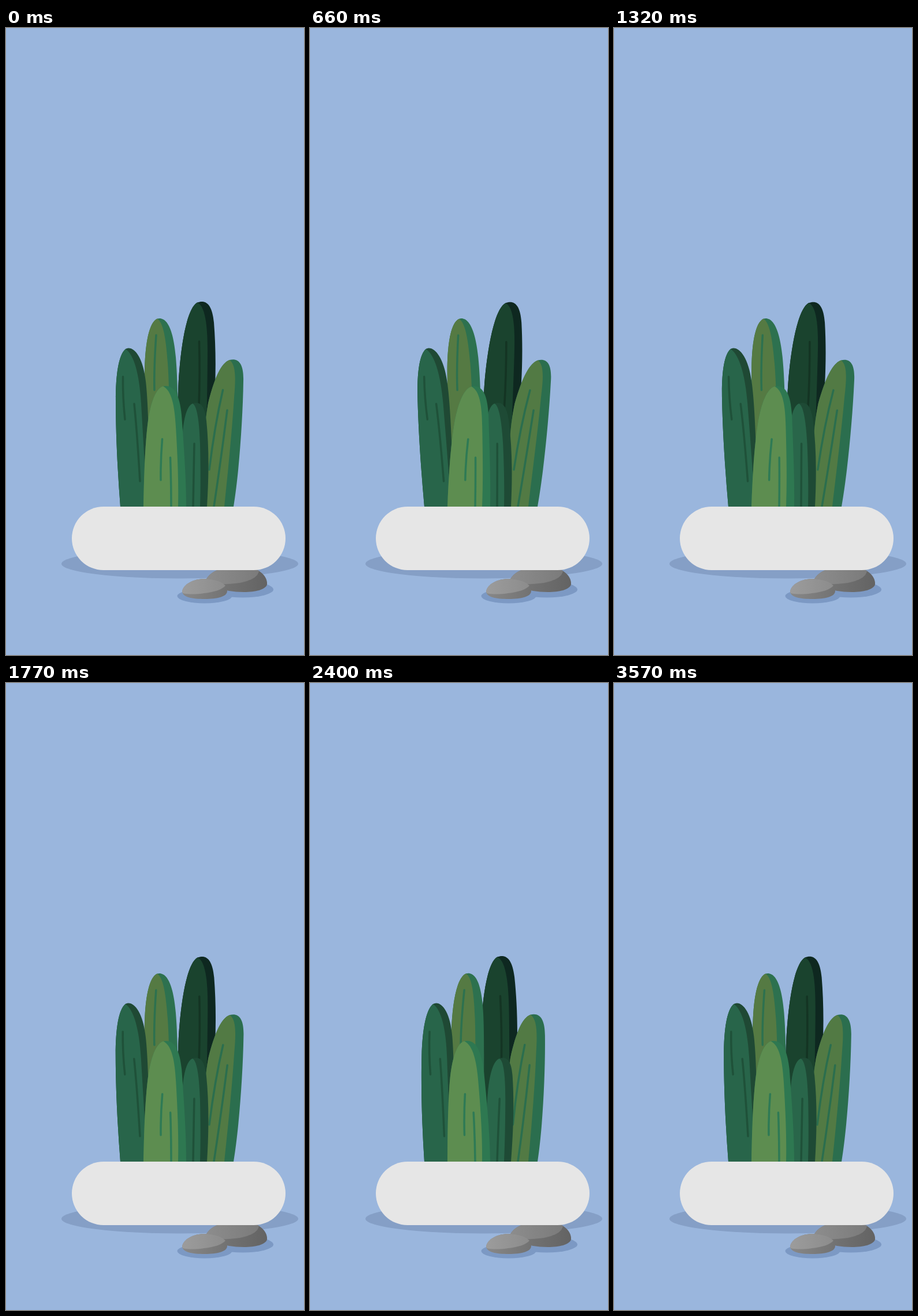
These frames come from a looping animation (516 px wide and 1086 px high, 3600 ms). An HTML page:

```html
<!DOCTYPE html>
<html lang="en">
<head>
<meta charset="utf-8">
<title>Swaying plant</title>
<style>
html, body { margin: 0; width: 100%; height: 100%; overflow: hidden; background: #9ab6dd; }
svg { display: block; width: 100%; height: 100%; }
#plant path { stroke-linecap: round; }
</style>
</head>
<body>
<svg viewBox="0 0 516 1086" preserveAspectRatio="none">
  <defs>
    <linearGradient id="big"><stop stop-color="#8d8d8d"/><stop offset="1" stop-color="#7b7b7b"/></linearGradient>
    <linearGradient id="bigDark"><stop stop-color="#7a7a7a"/><stop offset="1" stop-color="#636363"/></linearGradient>
    <linearGradient id="small"><stop stop-color="#9c9c9c"/><stop offset="1" stop-color="#8c8c8c"/></linearGradient>
    <linearGradient id="smallDark"><stop stop-color="#888"/><stop offset="1" stop-color="#727272"/></linearGradient>
  </defs>
  <ellipse cx="301" cy="928" rx="205" ry="25.5" fill="#859fc6"/>
  <g fill="#7c99c4">
    <ellipse cx="410" cy="972.5" rx="53" ry="14"/>
    <ellipse cx="344" cy="984" rx="47.5" ry="12.5"/>
  </g>
  <path fill="url(#bigDark)" d="M345,958C350,947 360,940 372,937C395,932 428,933 439,941C448,947 453,956 452,964C449,973 432,977 412,977C392,977 380,974 365,970Z"/>
  <path fill="url(#big)" d="M345,958C350,947 360,940 372,937C395,932 428,933 438,940C437,950 425,957 405,961C390,963 375,964 355,963Z"/>
  <path fill="url(#smallDark)" d="M305,976C307,963 325,954 344,954C364,954 381,963 383,975C383,985 366,989 344,989C322,989 306,986 305,976Z"/>
  <path fill="url(#small)" d="M305,976C307,963 325,954 344,954C360,954 374,959 380,966C373,973 361,977 343,979C330,981 315,981 306,979Z"/>
  <g id="plant"></g>
  <rect x="114" y="829" width="370" height="110" rx="55" fill="#e6e6e6"/>
</svg>
<script>
const BASE = 829, LOOP = 3600, STEP = 30;

// left: base to tip, right: tip to base, ridge: tip to base between the two tones
// sway: tip offset at the extremes of the first and second half of the loop
const leaves = [
  { top: 474, sway: [8, -8], dip: 0.13, tones: ['#1a432e', '#0e2820', '#143423'],
    left: 'M300,829C296,740 296,640 300,595C305,535 315,485 331,475.5',
    right: 'C346,470 357,478 360,510C364,560 364,620 358,680L350,829',
    ridge: 'C345,481 349,515 349,560C349,620 347,680 345,829',
    veins: ['M334.5,543Q336,600 334,655'] },
  { top: 502, sway: [-4.2, 9.5], dip: -0.04, tones: ['#557a43', '#2d714f', '#2d714f'],
    left: 'M255,829C248,750 240,660 240,605C240,550 247,510 262,503.5',
    right: 'C275,500 289,513 294,570C297,605 298,640 300,829',
    ridge: 'C273,511 277,540 280,580C283,620 284,700 284,829',
    veins: ['M260,532Q256,590 257,627'] },
  { top: 555, sway: [-7, 7], dip: 0, tones: ['#28654a', '#1f4934', '#1f5139'],
    left: 'M198,829C193,765 190,700 190,645C190,600 195,566 207,556',
    right: 'C219,549 237,566 242,612C247,655 248,740 248,829',
    ridge: 'C222,566 231,600 234,650C238,720 242,780 243,829',
    veins: ['M202.5,604Q202,640 206,678', 'M222,651Q227,700 232,785'] },
  { top: 574, sway: [8.3, -6], dip: 0.08, tones: ['#527a44', '#2b6e4e', '#2b6e4e'],
    left: 'M347,829C340,740 343,690 350,650C361,605 373,580 387,575',
    right: 'C403,571 412,582 411,612C410,680 403,775 394,829',
    ridge: 'C398,583 398,605 395,640C391,705 383,780 378,829',
    veins: ['M375.5,627Q361,690 352,765', 'M383,662Q372,750 360,829'] },
  { top: 649, sway: [-4, 5.5], dip: 0, tones: ['#29664a', '#1e4a35', '#1f5139'],
    left: 'M304,829C304,780 303,720 307,690C310,668 315,654 323,650.5',
    right: 'C336,646 344,654 347,680C352,730 351,780 348,829',
    ridge: 'C332,654 335,690 336,720C337,760 337,800 336,829',
    veins: ['M326,720Q325,775 324,829'] },
  { top: 620, sway: [8.3, -5.6], dip: 0.05, tones: ['#5d8d50', '#2e7851', '#2e7a55'],
    left: 'M238,829C239,760 242,710 246,680C251,646 260,624 272,620.5',
    right: 'C290,617 300,632 304,670C308,725 312,780 312,829',
    ridge: 'C287,628 292,655 294,690C297,740 299,785 298,829',
    veins: ['M270.5,712Q267.5,750 268,783', 'M284.5,744Q286,785 286,829'] }
];

const plant = document.getElementById('plant');
const parts = [];

function addPath(leaf, d, attrs) {
  const el = document.createElementNS('http://www.w3.org/2000/svg', 'path');
  for (const key in attrs) el.setAttribute(key, attrs[key]);
  plant.append(el);
  parts.push({ leaf, d, el });
}

for (const leaf of leaves) {
  const [light, dark, vein] = leaf.tones;
  addPath(leaf, leaf.left + leaf.right + 'Z', { fill: dark });
  addPath(leaf, leaf.left + leaf.ridge + 'Z', { fill: light });
  for (const d of leaf.veins) addPath(leaf, d, { fill: 'none', stroke: vein, 'stroke-width': 3.5 });
}

// Lean grows with height, so the base stays planted
function bend(leaf, d, wave) {
  const reach = Math.abs(wave) * leaf.sway[wave < 0 ? 1 : 0];
  return d.replace(/([\d.]+),([\d.]+)/g, (_, x, y) => {
    const dx = reach * ((BASE - y) / (BASE - leaf.top)) ** 1.45;
    return (+x + dx).toFixed(2) + ',' + (+y + dx * leaf.dip).toFixed(2);
  });
}

function draw(now) {
  const t = Math.floor((now % LOOP) / STEP) * STEP;
  const wave = Math.sin(2 * Math.PI * t / LOOP);
  for (const { leaf, d, el } of parts) el.setAttribute('d', bend(leaf, d, wave));
}

let start;
function tick(now) {
  start ??= now;
  draw(now - start);
  requestAnimationFrame(tick);
}
draw(0);
requestAnimationFrame(tick);
</script>
</body>
</html>
```
